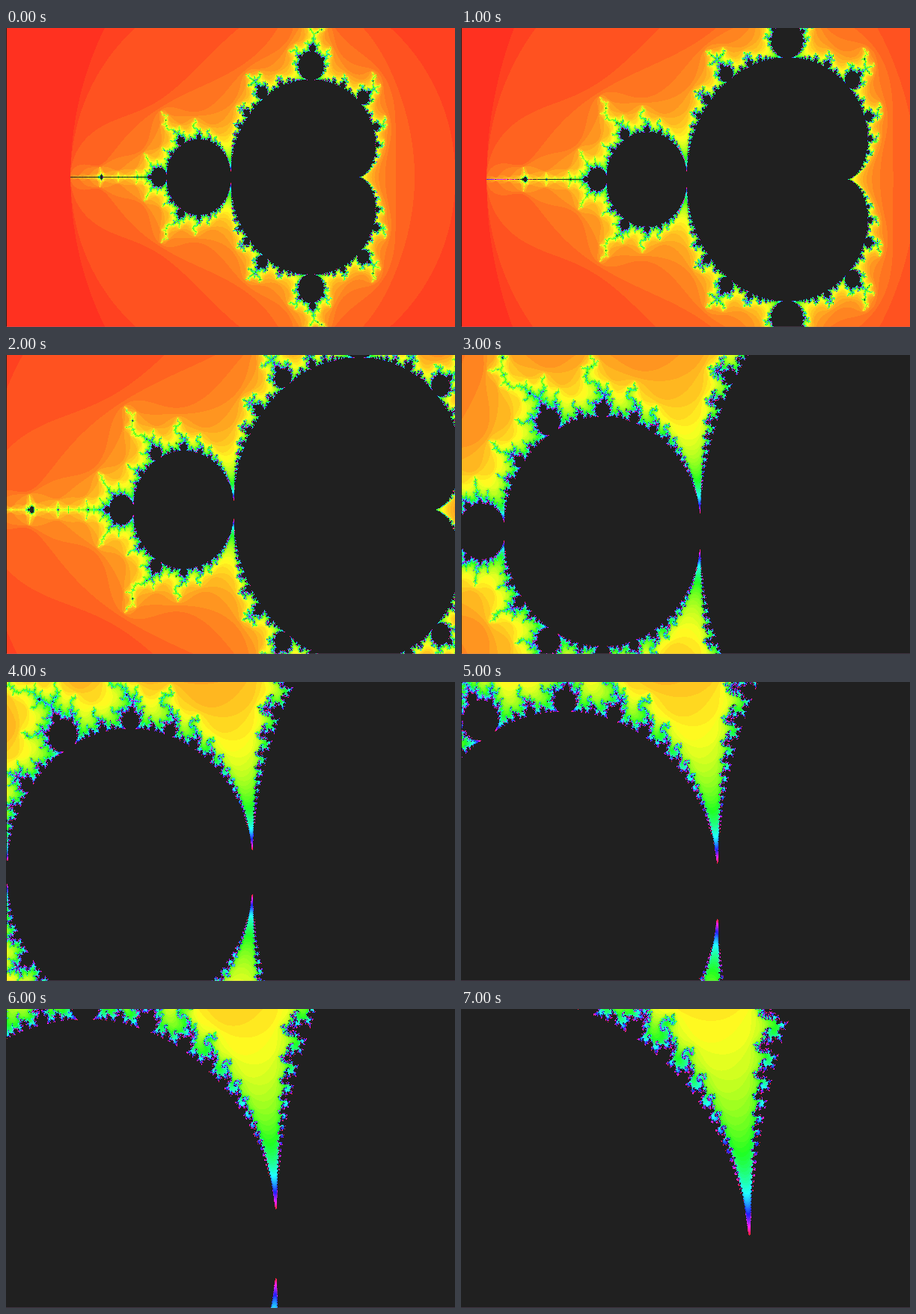
These frames come from a looping animation (600 px wide and 400 px high, 8000 ms). An HTML page with a canvas:

```html
<!DOCTYPE html>
<html lang="en">
<head>
<meta charset="utf-8">
<title>Mandelbrot zoom</title>
<style>
  html, body { margin: 0; width: 100%; height: 100%; overflow: hidden; background: #202020; }
  canvas { display: block; width: 600px; height: 400px; }
</style>
</head>
<body>
<canvas id="stage" width="600" height="400"></canvas>
<script>
const W = 600, H = 400, MAX = 80, HOLD = 1000;
const LOW = 32, SPAN = 223;
const STEPS = [0, 1, 2, 5, 6, 7, 8, 9]; // zoom depth of each picture
const ctx = document.getElementById('stage').getContext('2d');
const cache = [];

// One full turn of hue over the iteration range; the set itself is dark.
const palette = Array.from({ length: MAX + 1 }, (_, m) => {
  if (m === 0 || m === MAX) return [LOW, LOW, LOW];
  const h = 6 * m / MAX;
  const channel = shift => {
    const d = Math.abs((h + shift) % 6 - 3);
    return Math.round(LOW + SPAN * Math.min(1, Math.max(0, d - 1)));
  };
  return [channel(0), channel(4), channel(2)];
});

function inSet(a, b) {
  const q = (a - 0.25) ** 2 + b * b;
  return q * (q + a - 0.25) <= b * b / 4 || (a + 1) ** 2 + b * b <= 1 / 16;
}

function escapeCount(a, b) {
  if (inSet(a, b)) return MAX;
  let x = 0, y = 0, m = 0;
  while (m < MAX && x * x + y * y <= 4) {
    const t = x * x - y * y + a;
    y = 2 * x * y + b;
    x = t;
    m++;
  }
  return m;
}

function render(step) {
  const img = ctx.createImageData(W, H);
  const scale = 0.8 ** step;
  const cx = -0.75 - 0.0075 * step, cy = -0.012 * step;
  for (let py = 0, i = 0; py < H; py++) {
    const b = cy + ((py + 1) / 200 - 1) * scale; // rows count up from the bottom edge
    for (let px = 0; px < W; px++, i += 4) {
      const a = cx + (px / 300 - 1) * 1.75 * scale;
      const m = px ? escapeCount(a, b) : 0; // the first column stays dark
      const [r, g, bl] = palette[m];
      img.data[i] = r;
      img.data[i + 1] = g;
      img.data[i + 2] = bl;
      img.data[i + 3] = 255;
    }
  }
  return img;
}

let shown = -1;
function draw(time) {
  const k = Math.floor(time / HOLD) % STEPS.length;
  if (k === shown) return;
  cache[k] = cache[k] || render(STEPS[k]);
  ctx.putImageData(cache[k], 0, 0);
  // faint lower edge
  ctx.fillStyle = 'rgba(150, 110, 160, 0.25)';
  ctx.fillRect(0, H - 1, W, 1);
  shown = k;
}

const start = performance.now();
function tick() {
  draw(performance.now() - start);
  requestAnimationFrame(tick);
}
tick();
</script>
</body>
</html>
```
